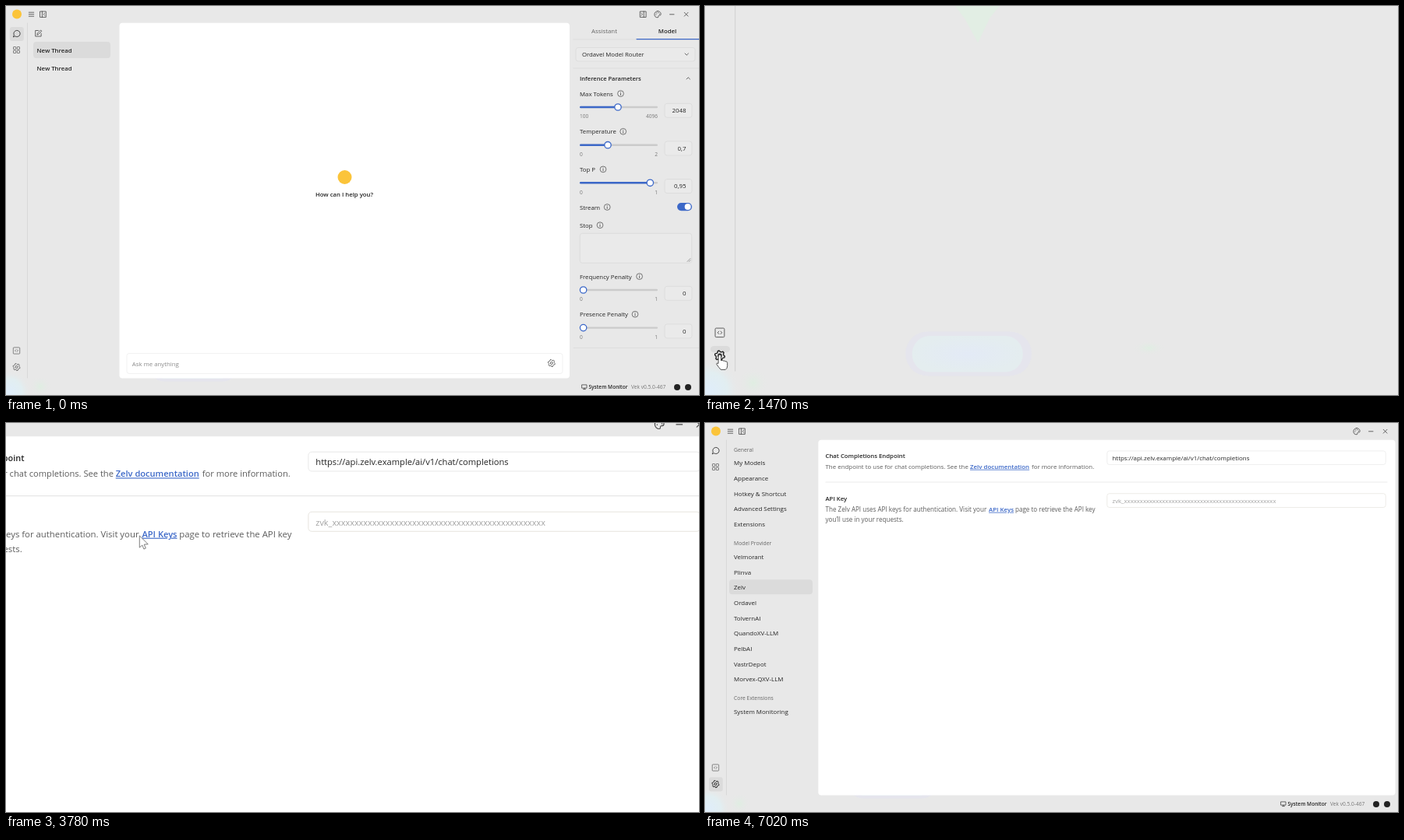
Recreate the animation shown at these times as an HTML page. Size 889 by 500 pixels, loop 7.08 s.

```html
<!DOCTYPE html>
<html lang="en">
<head>
<meta charset="utf-8">
<title>Settings tour</title>
<style>
html, body { margin: 0; width: 100%; height: 100%; overflow: hidden; background: #e8e8e8; }
svg { display: block; width: 889px; height: 500px; }
text { font-family: "Open Sans", "Noto Sans", sans-serif; white-space: pre; }
</style>
</head>
<body>
<svg id="stage" viewBox="0 0 889 500" xmlns="http://www.w3.org/2000/svg"></svg>
<script>
const LOOP = 7080, W = 889, H = 500, ZOOM = 0.406;
const BLUE = '#3c68c8', INK = '#242424', GREY = '#777', LINE = '#d8d8d8', PICK = '#dbdbdb', LOGO = '#fbc43a';

// Drawing helpers; text is placed by the middle of its line.
const text = (x, y, s, { size = 7.85, weight = 400, fill = INK, anchor = 'start', extra = '' } = {}) =>
  `<text x="${x}" y="${y + size * 0.35}" font-size="${size}" font-weight="${weight}" fill="${fill}" text-anchor="${anchor}" ${extra}>${s}</text>`;
const rect = (x, y, w, h, fill, r = 0, extra = '') =>
  `<rect x="${x}" y="${y}" width="${w}" height="${h}" rx="${r}" fill="${fill}" ${extra}/>`;
const dot = (x, y, r, fill, extra = '') => `<circle cx="${x}" cy="${y}" r="${r}" fill="${fill}" ${extra}/>`;
const path = (d, color = '#444', width = 0.8, extra = '') =>
  `<path d="${d}" fill="none" stroke="${color}" stroke-width="${width}" stroke-linecap="round" stroke-linejoin="round" ${extra}/>`;
const at = (x, y, body) => `<g transform="translate(${x} ${y})">${body}</g>`;
const group = (id, body) => `<g id="${id}">${body}</g>`;
const outline = (color, width = 0.7) => `stroke="${color}" stroke-width="${width}"`;

// Icons
const gear = (x, y, color = '#444', width = 0.8) => {
  const points = [];
  for (let i = 0; i < 24; i++) {
    const a = (i + 0.5) * Math.PI / 12, r = i % 4 < 2 ? 4.6 : 3.5;
    points.push(`${(r * Math.sin(a)).toFixed(2)} ${(r * Math.cos(a)).toFixed(2)}`);
  }
  return at(x, y, path(`M${points.join('L')}Z`, color, width) + dot(0, 0, 1.5, 'none', outline(color, width)));
};
const info = (x, y) => at(x, y, dot(0, 0, 3.9, 'none', outline('#444')) + path('M0 -.3V1.9M0 -1.9V-1.8'));
const panelIcon = (x, y, flip = 1) => at(x, y,
  `<g transform="scale(${flip} 1)">` + path('M-3.7 -3.7H3.7V3.7H-3.7ZM-1.2 -3.7V3.7M2 -1.5L.6 0L2 1.5') + '</g>');
const palette = (x, y) => at(x, y,
  path('M0 -4.1A4.1 4.1 0 1 0 0 4.1C1.6 4.1 .2 2.2 1.4 1.5C2.4 1 4.2 2 4.2 -.4C4 -2.8 2.2 -4.1 0 -4.1Z') +
  [[-2, .3], [-1.2, -1.8], [1, -2.1], [2.4, -.5]].map(p => dot(...p, .55, '#444')).join(''));
const chat = (x, y) => at(x, y, path('M-4 4L-3.2 1.8A4.1 4.1 0 1 1 -1.7 3.5Z', '#333', 0.9));
const grid = (x, y) => at(x, y, [[-4, -4], [.7, -4], [-4, .7], [.7, .7]]
  .map(([a, b]) => rect(a, b, 3.3, 3.3, 'none', .5, outline('#555'))).join(''));
const code = (x, y) => at(x, y, rect(-4.2, -4.1, 8.4, 8.2, 'none', .9, outline('#5a5a5a')) +
  path('M-.8 -1.2L-2 0L-.8 1.2M.8 -1.2L2 0L.8 1.2', '#5a5a5a', .7));
const edit = (x, y) => at(x, y, path('M0 -3.5H-3.8V4H3.6V.2M-1.5 1.7L-1.1 0L3 -4.1L4.3 -2.8L.2 1.3Z'));

const backdrop = () => `
  <defs>
    <radialGradient id="sky"><stop offset="0" stop-color="#dfedfa"/><stop offset=".6" stop-color="#e2eef1"/><stop offset="1" stop-color="#e8e8e8" stop-opacity="0"/></radialGradient>
    <radialGradient id="mint"><stop offset="0" stop-color="#dfeee2"/><stop offset="1" stop-color="#e8e8e8" stop-opacity="0"/></radialGradient>
    <radialGradient id="pool"><stop offset="0" stop-color="#e3eaf6"/><stop offset="1" stop-color="#e4edef"/></radialGradient>
  </defs>` +
  rect(0, 0, W, H, '#e8e8e8') +
  rect(183, 442, 115, 40.5, '#e5e5ed', 20) + rect(189, 446, 101, 33, 'url(#pool)', 16) +
  '<path d="M228 144H269L260 155L249 178L237 156Z" fill="#e2eee4"/>' +
  '<ellipse cx="405" cy="457" rx="15" ry="7" fill="url(#mint)"/>' +
  dot(4, 496, 28, 'url(#sky)') + dot(44, 489, 14, 'url(#mint)');

const frameParts = () =>
  dot(14, 10.5, 6, LOGO) + path('M29.3 8.2H35.7M29.3 10.7H35.7M29.3 13.2H35.7') + panelIcon(47.6, 10.7) +
  palette(836, 10.7) + path('M851.5 10.8H857M870.2 8.3L875 13.1M875 8.3L870.2 13.1') +
  path('M27.5 22V478', '#d2d2d2', .7) +
  at(742, 489.5, path('M-3 -2.6H3V1.6H-3ZM-1.4 3.1H1.4M0 1.6V3.1')) +
  text(747.5, 490, 'System Monitor', { size: 6.55, weight: 600 }) +
  text(802, 490, 'Vek v0.5.0-467', { size: 6.6, fill: GREY }) +
  dot(861, 490, 4, '#222') + dot(875, 490, 4, '#222');

const railIcons = () => chat(13.5, 35.5) + grid(13.5, 56.5) + code(13.5, 443);

const label = { size: 7.8, weight: 500 };
const heading = { size: 7.75, weight: 600 };

const slider = ([name, y, infoX, knob, min, max, value]) => {
  const small = { size: 6.6, fill: GREY };
  return text(736, y, name, label) + info(infoX, y - .4) +
    rect(736, y + 15.8, 100, 2.4, '#cbcbcb', 1.2) + rect(736, y + 15.8, knob - 736, 2.4, BLUE, 1.2) +
    dot(knob, y + 17, 4.2, '#fff', outline(BLUE, 1.3)) +
    text(736, y + 29, min, small) + text(836, y + 29, max, { ...small, anchor: 'end' }) +
    rect(845, y + 12.3, 35, 18, '#eaeaea', 3, outline(LINE)) +
    text(872.5, y + 21.3, value, { anchor: 'end' });
};

const chatPage = () =>
  panelIcon(817, 10.7, -1) + edit(41.5, 35) +
  rect(35, 46, 99, 21, PICK, 4) +
  [57, 80].map(y => text(39.5, y, 'New Thread', heading)).join('') +
  rect(145.5, 21.8, 577.5, 456.7, '#fff', 4) +
  dot(434.5, 220, 9, LOGO) +
  text(434, 242.3, 'How can I help you?', { ...heading, anchor: 'middle' }) +
  rect(155, 446.5, 559, 26, '#fff', 3, outline('#ececec')) +
  text(161.8, 460, 'Ask me anything', { fill: '#8a8a8a', size: 7.8 }) + gear(699.8, 459) +
  text(767.5, 32.3, 'Assistant', { anchor: 'middle', fill: '#666' }) +
  text(848.5, 32.3, 'Model', { ...heading, anchor: 'middle' }) +
  path('M728 43H889M728 80H889M728 439.5H889', LINE, .7) + path('M809 42.6H889', BLUE, 1.1) +
  rect(731, 53.5, 153, 17.5, '#eaeaea', 3, outline(LINE)) +
  text(739, 62.3, 'Ordavel Model Router', { size: 7.75 }) + path('M871 61L873.2 63.2L875.4 61M873 94L875.2 91.8L877.4 94') +
  text(736, 93.3, 'Inference Parameters', { size: 7.55, weight: 600 }) +
  [
    ['Max Tokens', 113, 788.5, 785, 100, 4096, '2048'],
    ['Temperature', 161.7, 791.7, 772, 0, 2, '0,7'],
    ['Top P', 210.3, 766, 826.3, 0, 1, '0,95'],
    ['Frequency Penalty', 348, 812.6, 740.6, 0, 1, '0'],
    ['Presence Penalty', 396.6, 807, 740.6, 0, 1, '0']
  ].map(slider).join('') +
  text(736, 259, 'Stream', label) + info(771.2, 258.5) +
  rect(861, 253, 19, 10.2, BLUE, 5.1) + dot(874.6, 258.1, 4, '#fff') +
  text(736, 282.2, 'Stop', label) + info(762, 281.7) +
  rect(736.3, 292.3, 143.4, 38, '#eaeaea', 3, outline(LINE)) + path('M874 328.5L878 324.5M876.3 328.5L878 326.8', '#666', .6);

const menu = {
  34.5: ['General', 'My Models', 'Appearance', 'Hotkey &amp; Shortcut', 'Advanced Settings', 'Extensions'],
  155: ['Model Provider', 'Velmorant', 'Plinva', 'Zelv', 'Ordavel', 'TolvernAI', 'QuandoXV-LLM', 'PelbAI', 'VastrDepot', 'Morvex-QXV-LLM'],
  354: ['Core Extensions', 'System Monitoring']
};
const menuList = () => Object.entries(menu).map(([y, [head, ...items]]) =>
  text(37, +y, head, { size: 6.8, fill: '#666' }) +
  items.map((item, i) => text(37, +y + 17.2 + i * 19.67, item, { size: 7.95, weight: 500 })).join('')).join('');

const soft = { fill: '#5c5c5c', size: 7.92 };
const softWide = { ...soft, size: 8.08 };
const link = { fill: BLUE, size: 7.9, weight: 600, extra: 'text-decoration="underline"' };
const providerPage = () =>
  text(154.5, 41.8, 'Chat Completions Endpoint', heading) +
  text(154.5, 56, 'The endpoint to use for chat completions. See the', soft) +
  text(340, 56, 'Zelv documentation', link) + text(419, 56, 'for more information.', soft) +
  path('M155 76H875', '#e6e6e6', .8) +
  text(154.5, 97, 'API Key', heading) +
  text(154.5, 111, 'The Zelv API uses API keys for authentication. Visit your', softWide) +
  text(364, 111, 'API Keys', link) + text(398, 111, 'page to retrieve the API key', softWide) +
  text(154.5, 124.5, 'you’ll use in your requests.', softWide) +
  rect(515.8, 35.9, 357.4, 17.6, '#fff', 3, outline('#e8e8e8')) +
  text(522.5, 45, 'https://api.zelv.example/ai/v1/chat/completions', { size: 7.95 }) +
  rect(515.8, 90.7, 357.4, 17.8, '#fff', 3, 'id="keyBox" stroke-width=".7"') +
  text(522.5, 100.6, 'zvk_' + 'x'.repeat(48), { fill: '#a2a2a2', size: 7.75 });

const settingsPage = () =>
  rect(31, 0, 107, 19, PICK, 4, 'id="menuPick"') + menuList() +
  rect(145.3, 21.8, 740.2, 456.7, '#fff', 4) + group('provider', providerPage());

const pointers = () =>
  group('arrow', '<path d="M0 0V10.8L2.5 8.6L4 12.2L5.7 11.4L4.2 8L7.8 7.7Z" fill="#fff" stroke="#555" stroke-width=".55"/>') +
  group('hand', '<path d="M-1 1.2Q-1 -.3 .2 -.3T1.4 1.2V5Q2.8 4.3 3.3 5.3Q4.8 4.8 5.2 5.8Q7 5.4 7.2 7V10Q7 12.5 5.5 13.3H1.2Q-.5 11.5 -2.6 8.4Q-2.8 6.8 -1 7.6Z" fill="#fff" stroke="#333" stroke-width=".6"/>') +
  group('beam', path('M-2.8 -5.5H-.8L0 -5L.8 -5.5H2.8M0 -5V5M-2.8 5.5H-.8L0 5L.8 5.5H2.8', '#222', .9));

document.getElementById('stage').innerHTML = group('world',
  backdrop() + rect(4.8, 27, 18, 18, PICK, 3, 'id="chatPick"') + rect(5, 455.2, 17.8, 18.4, PICK, 3, 'id="gearPick"') +
  frameParts() + group('chatPage', chatPage()) + group('settingsPage', settingsPage()) +
  railIcons() + group('gearThin', gear(13.5, 464, '#555')) + group('gearBold', gear(13.5, 464, '#222', 1)) +
  group('pointer', pointers()));

const el = {};
document.querySelectorAll('[id]').forEach(node => el[node.id] = node);

// Motion
const span = (t, a, b) => Math.min(1, Math.max(0, (t - a) / (b - a)));
const inOut = u => u < 0.5 ? 4 * u ** 3 : 1 - 4 * (1 - u) ** 3;
const smooth = u => u * u * (3 - 2 * u);
const out = u => 1 - (1 - u) ** 3;
const mix = (a, b, u) => a + (b - a) * u;
const show = (node, on) => node.setAttribute('display', on ? 'inline' : 'none');
const between = (t, a, b) => t >= a && t < b;

// Pointer stops: time, x, y in page coordinates
const stops = [
  [540, 190, 400], [840, 22.2, 468], [1000, 13.2, 463.5], [1980, 13.2, 463.5], [2670, 64, 209],
  [2940, 54, 210], [3180, 54, 210], [3480, 183.5, 197], [3900, 405, 92], [4560, 520, 103],
  [4890, 520, 103], [5000, 527, 109.5], [5430, 527, 109.5], [5790, 383, 207], [6030, 383, 207],
  [6150, 364, 233], [6400, 350, 262]
];
function pointerAt(t) {
  const next = stops.findIndex(s => s[0] > t);
  const b = stops.at(next), a = next > 0 ? stops[next - 1] : b;
  const u = a === b ? 0 : smooth(span(t, a[0], b[0]));
  return [mix(a[1], b[1], u), mix(a[2], b[2], u)];
}

function render(t) {
  const scale = 1 + ZOOM * (inOut(span(t, 686, 1230)) - inOut(span(t, 6160, 6690)));
  const pan = inOut(span(t, 3490, 3880));
  el.world.setAttribute('transform',
    `translate(${W * (1 - scale) * pan} ${H * (1 - scale) * (1 - pan)}) scale(${scale})`);

  const inSettings = t >= 1530, left = t >= 1380;
  show(el.chatPage, !left);
  show(el.chatPick, !left);
  show(el.settingsPage, inSettings);
  show(el.provider, t >= 3240);
  show(el.gearThin, !left);
  show(el.gearBold, left);
  el.gearPick.setAttribute('opacity', left ? 1 : 0.45 * span(t, 780, 870));
  el.gearPick.setAttribute('height', left ? mix(5.7, 18.4, span(t, 1470, 1530)) : 18.4);
  el.menuPick.setAttribute('y', mix(42, 201.3, out(span(t, 3210, 3585))));

  el.keyBox.setAttribute('stroke', between(t, 4500, 5580) ? '#5f87cc' : '#e6e4de');

  const [x, y] = pointerAt(t);
  const beam = between(t, 4500, 5480);
  const hand = between(t, 900, 2020) || between(t, 2560, 3300);
  el.pointer.setAttribute('transform', `translate(${x} ${y})`);
  el.pointer.setAttribute('opacity', span(t, 540, 620) - span(t, 6260, 6400));
  show(el.beam, beam);
  show(el.hand, hand);
  show(el.arrow, !beam && !hand);
}

function tick() {
  render(performance.now() % LOOP);
  requestAnimationFrame(tick);
}
tick();
</script>
</body>
</html>
```
